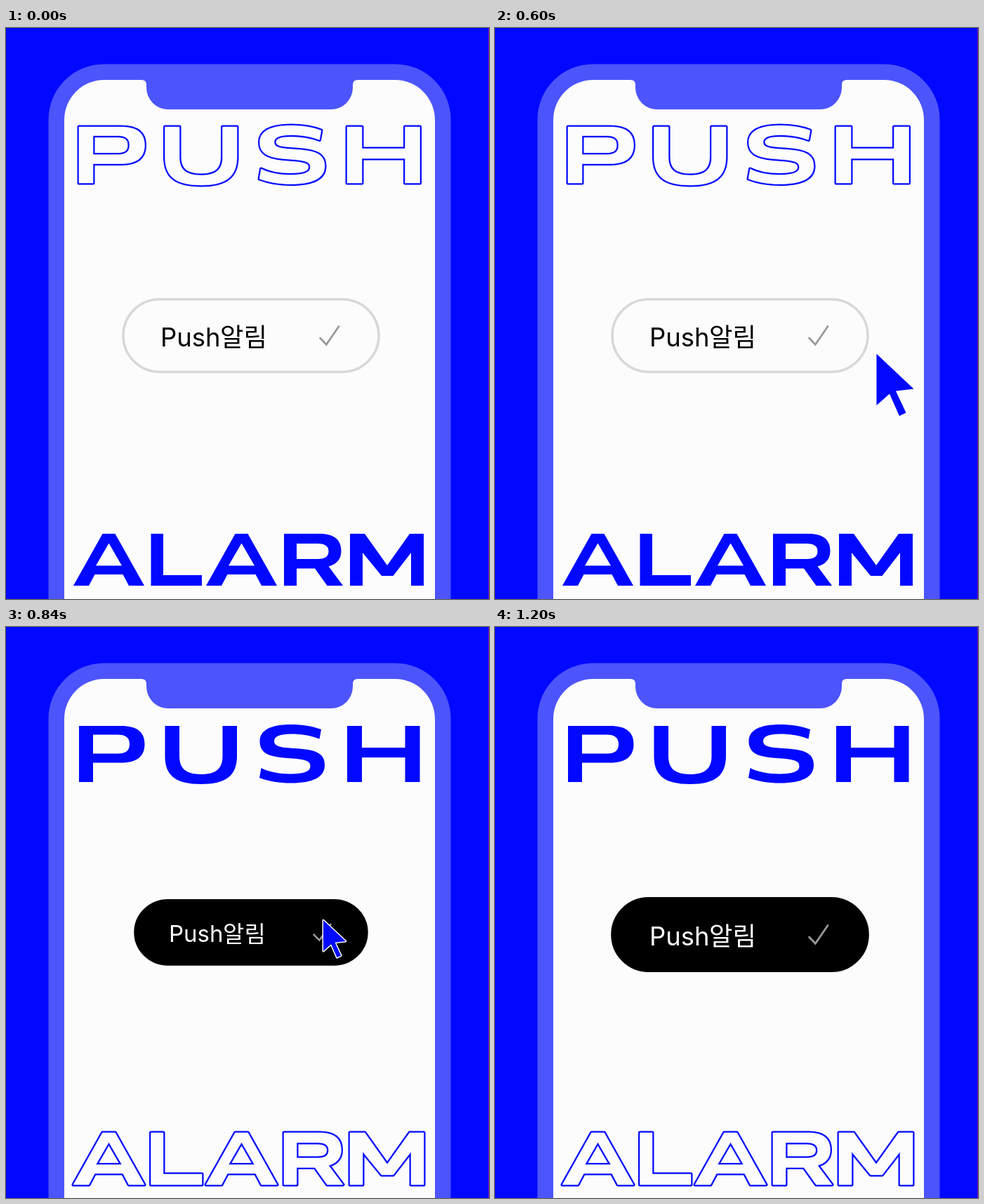
Write an HTML page that moves like this. It is 688 px wide and 814 px high and loops after 2.04 s.

```html
<!DOCTYPE html>
<html lang="ko">
<head>
<meta charset="utf-8">
<title>Push alarm</title>
<style>
  html, body { margin: 0; width: 100%; height: 100%; overflow: hidden; background: #0008ff; }
  svg { display: block; width: 100vw; height: 100vh; }
  .word { fill: #0008ff; stroke-linejoin: round; }
  .word .rim, .word .inside { display: none; }
  .word.outlined .rim { display: inline; stroke: #0008ff; stroke-width: 5; }
  .word.outlined .inside { display: inline; fill: #fcfcfc; stroke: #fcfcfc; stroke-width: 0.5; }
  .word.outlined .solid { display: none; }
  #label { font: 400 36.4px Inter, "Noto Sans CJK KR", "Noto Sans CJK", sans-serif; }
</style>
</head>
<body>
<svg viewBox="0 0 688 814" xmlns="http://www.w3.org/2000/svg">
  <defs>
    <g id="push-letters">
      <path d="M104 141H164C187 141 197.500 150 197.500 167C197.500 184 187 193.500 164 193.500H124V221H104Z
               M124 153.500V180.500H159C171 180.500 176 176 176 167C176 158 171 153.500 159 153.500Z"/>
      <path d="M226.500 141H247V184C247 201.500 256 210 278 210C299.500 210 308.500 201.500 308.500 184V141H329V184
               C329 212 313 224 278 224C242 224 226.500 212 226.500 184Z"/>
      <path d="M449 146C437 141.500 422 139 406 139C377 139 361.500 147 361.500 163C361.500 178 372 184.500 396 186.500
               L409 187.500C427 189 433.500 191 433.500 198.500C433.500 206 424 209.500 405 209.500
               C389 209.500 374 206.500 363.500 201L361 215C374 220 390 222.500 406 222.500
               C437 222.500 454 214 454 197C454 181 443 175.500 418 173.500L404 172.500
               C388 171.500 382 169 382 162.500C382 156 390 152.500 406 152.500C421 152.500 435 155 446.500 159.500Z"/>
      <path d="M486 141H507V172H568.500V141H589.500V221H568.500V186H507V221H486Z"/>
    </g>
    <path id="letter-a" d="M96 795L137.500 721H155.500L197 795H175L166.500 779H126.500L118 795Z
                           M146.500 734.500L128 766.500H165Z"/>
    <g id="alarm-letters">
      <use href="#letter-a"/>
      <path d="M206.500 721H224V780H279V795H206.500Z"/>
      <use href="#letter-a" x="189"/>
      <path d="M396 721H447C468 721 477.500 730 477.500 745.500C477.500 757 471 764.500 459.500 767.500
               L480 795H457.500L440 770.500H414V795H396Z
               M414 735V757H444C455 757 459.500 753 459.500 746C459.500 739 455 735 444 735Z"/>
      <path d="M490 721H511L543 766L575 721H595V795H577V748L551.500 781H535L508 748V795H490Z"/>
    </g>
  </defs>

  <rect width="688" height="814" fill="#0008ff"/>
  <rect x="687" width="1" height="814" fill="#7a10c0"/>
  <rect x="60.500" y="51.500" width="573" height="900" rx="79" fill="#4c54fb"/>
  <path fill="#fcfcfc" d="M83 820V131A57 57 0 0 1 140 74H193Q200 74 200 81V85A31 31 0 0 0 231 116
    H463A31 31 0 0 0 494 85V81Q494 74 501 74H554A57 57 0 0 1 611 131V820Z"/>

  <g id="push" class="word" role="img" aria-label="PUSH">
    <use class="rim" href="#push-letters"/>
    <use class="inside" href="#push-letters"/>
    <use class="solid" href="#push-letters"/>
  </g>
  <g id="alarm" class="word" role="img" aria-label="ALARM">
    <use class="rim" href="#alarm-letters"/>
    <use class="inside" href="#alarm-letters"/>
    <use class="solid" href="#alarm-letters"/>
  </g>

  <!-- Button, drawn around its own centre -->
  <g id="button">
    <rect id="pill" x="-182" y="-51.700" width="364" height="103.400" rx="51.700" stroke-width="3.6"/>
    <text id="label" x="-129" y="15">Push<tspan x="-44">알림</tspan></text>
    <path d="M98.500 3.500L107.300 12.800L125 -13" fill="none" stroke="#999" stroke-width="2.8"
          stroke-linecap="round"/>
  </g>

  <path id="cursor" d="M0 0L53 50L27.500 53L42 84L32.500 88.500L18.500 57L0 73.500Z"
        fill="#0008ff" stroke="#fcfcfc" stroke-width="5" stroke-linejoin="round" paint-order="stroke"/>
</svg>

<script>
const LOOP = 2040, STEP = 40;
const CLICK = 840, LEAVE = 960;
const [push, alarm, button, pill, label, cursor] =
  ["push", "alarm", "button", "pill", "label", "cursor"].map(id => document.getElementById(id));

const ease = (t, from, to) => {
  const s = Math.min(1, Math.max(0, (t - from) / (to - from)));
  return s * s * (3 - 2 * s);
};
const mix = (a, b, u) => a + (b - a) * u;
const bend = (a, b, c, u) => mix(mix(a, b, u), mix(b, c, u), u);

function cursorTip(t) {
  if (t < LEAVE) {
    const u = ease(t, 340, 790);
    return [mix(690, 452, u), mix(539, 418, u)];
  }
  const u = ease(t, LEAVE, 1200);
  return [bend(452, 645, 692, u), bend(418, 417, 14, u)];
}

function draw(t) {
  const on = t >= CLICK;
  push.classList.toggle("outlined", !on);
  alarm.classList.toggle("outlined", on);

  const press = ease(t, 640, 860) - ease(t, 880, 1040);
  button.setAttribute("transform",
    `translate(349 ${438.5 - 3.3 * press}) scale(${1 - 0.095 * press} ${1 - 0.117 * press})`);
  pill.setAttribute("fill", on ? "#000" : "#fcfcfc");
  pill.setAttribute("stroke", on ? "#000" : "#d8d8d8");
  label.setAttribute("fill", on ? "#fff" : "#000");

  const [x, y] = cursorTip(t);
  const squeeze = ease(t, 640, 820) - ease(t, 860, 1000);
  cursor.setAttribute("transform", `translate(${x} ${y}) scale(${1 - 0.4 * squeeze})`);
  cursor.setAttribute("visibility", t >= 400 && t < 1200 ? "visible" : "hidden");
}

const start = performance.now();
function tick() {
  const t = (performance.now() - start) % LOOP;
  draw(Math.floor(t / STEP) * STEP);
  requestAnimationFrame(tick);
}
tick();
</script>
</body>
</html>
```
